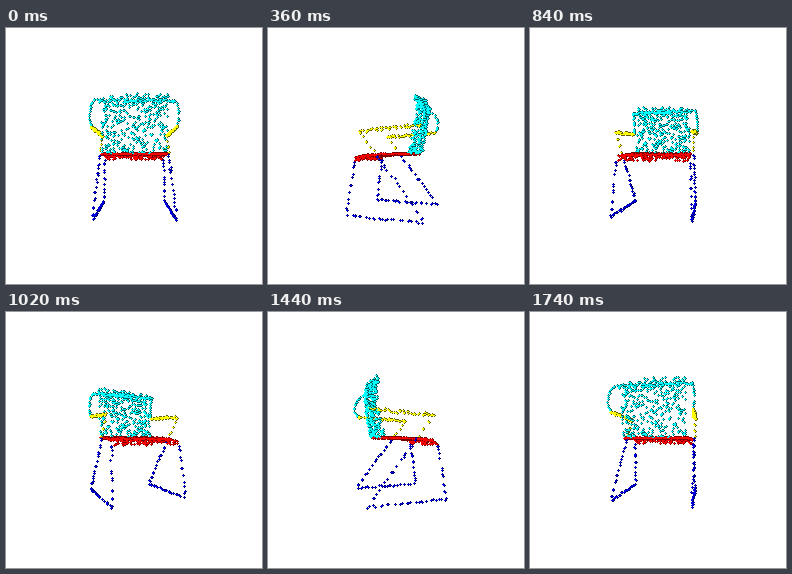
Animation, 256 px wide and 256 px high, one loop 1800 ms. Source, as an HTML page with a canvas:

```html
<!DOCTYPE html>
<html lang="en">
<head>
<meta charset="utf-8">
<title>Turning chair</title>
<style>
  html, body { margin: 0; width: 100%; height: 100%; overflow: hidden; background: #fff; }
  canvas { display: block; width: 100vw; height: 100vh; image-rendering: pixelated; }
</style>
</head>
<body>
<canvas id="stage" width="256" height="256"></canvas>
<script>
const ctx = document.getElementById('stage').getContext('2d');
const STEP = 60, STEPS = 30;
const CX = 128, HORIZON = 126, DIST = 220, BUMP = 12;

// each colour: [core, rim]
const CYAN = ['#00ffff', '#005c5c'];
const YELLOW = ['#ffff00', '#5c5c00'];
const RED = ['#ff0000', '#7a0000'];
const BLUE = ['#0000e6', '#000070'];

let seed = 41;
function rand() {
  seed = (seed * 1664525 + 1013904223) % 4294967296;
  return seed / 4294967296;
}
const span = (a, b) => a + (b - a) * rand();
const mix = (a, b, t) => a + (b - a) * t;

// s: sideways, u: towards the backrest, y: up
const points = [];
const add = (s, u, y, color) => points.push({ s, u, y, color });

function tube(a, b, count, color, noise) {
  for (let i = 0; i < count; i++) {
    const t = Math.min(1, Math.max(0, (i + span(-0.4, 1.4)) / count));
    const [s, u, y] = a.map((v, k) => mix(v, b[k], t) + span(-noise, noise));
    add(s, u, y, color);
  }
}

function buildSide(m) {
  const armFront = [35.5 * m, -23, 20.5];
  const armRear = [36.5 * m, 33, 23.5];
  const joint = [35.5 * m, -8, 1.5];
  const rear = [35.2 * m, 35.8, -54.8];
  const front = [35.2 * m, -35.8, -54.8];
  tube(armFront, armRear, 50, YELLOW, 1.2);
  tube(armFront, joint, 6, YELLOW, 0.6);
  tube(joint, rear, 20, BLUE, 0.7);
  tube(front, rear, 25, BLUE, 0.7);
  tube([33 * m, -28, -3], front, 14, BLUE, 0.7);

  const arc = [[35, 27, 47], [36.5, 33, 43], [37, 36, 36], [37, 36, 28], [36.5, 33, 24]];
  for (let i = 1; i < arc.length; i++) {
    const [a, b] = [arc[i - 1], arc[i]].map(p => [p[0] * m, p[1], p[2]]);
    tube(a, b, 4, CYAN, 0.5);
  }
}

function buildSeat() {
  for (let i = 0; i < 480; i++) {
    const f = rand();
    const half = mix(31, 33, f);
    const y = 0.8 - 1.4 * f - 2.4 * f ** 6 + span(-0.5, 0.5);
    add(span(-half, half), mix(19, -29, f), y, RED);
  }
  for (let i = 0; i < 50; i++) add(span(-32, 32), span(-30, -27), span(-6, -2), RED);
}

function buildBack() {
  for (let i = 0; i < 310; i++) {
    const t = rand();
    const u = 20 + 7 * Math.sin(t * Math.PI / 2) + span(-0.8, 0.8);
    add(span(-29.5, 29.5), u, mix(1, 46, t), CYAN);
  }
  for (let i = 0; i < 100; i++) add(span(-35, 35), 27 + span(-1, 1), 47 + span(-1.3, 1.3), CYAN);
  for (let i = 0; i < 50; i++) add(span(-29.5, 29.5), span(25, 30), span(47, 53), CYAN);
}

buildSide(-1);
buildSide(1);
buildSeat();
buildBack();

function rim(x, y) {
  ctx.fillRect(x - 1, y, 3, 1);
  ctx.fillRect(x, y - 1, 1, 3);
}

function core(x, y) {
  ctx.fillRect(x - 1, y, 2, 1);
}

function draw(angle) {
  const sin = Math.sin(angle), cos = Math.cos(angle);
  const layers = [];
  for (const p of points) {
    const z = p.u * cos - p.s * sin;
    const k = 1 / (1 - z / DIST);
    const x = Math.round(CX + (p.u * sin + p.s * cos) * k);
    const y = Math.round(HORIZON - p.y * k);
    layers.push({ x, y, z, paint: rim, fill: p.color[1] });
    layers.push({ x, y, z: z + BUMP, paint: core, fill: p.color[0] });
  }
  layers.sort((a, b) => a.z - b.z);
  ctx.fillStyle = '#fff';
  ctx.fillRect(0, 0, 256, 256);
  for (const l of layers) {
    ctx.fillStyle = l.fill;
    l.paint(l.x, l.y);
  }
}

const start = performance.now();
let shown = -1;
function tick() {
  const step = Math.floor((performance.now() - start) / STEP) % STEPS;
  if (step !== shown) {
    shown = step;
    draw(step / STEPS * 2 * Math.PI);
  }
  requestAnimationFrame(tick);
}
tick();
</script>
</body>
</html>
```
